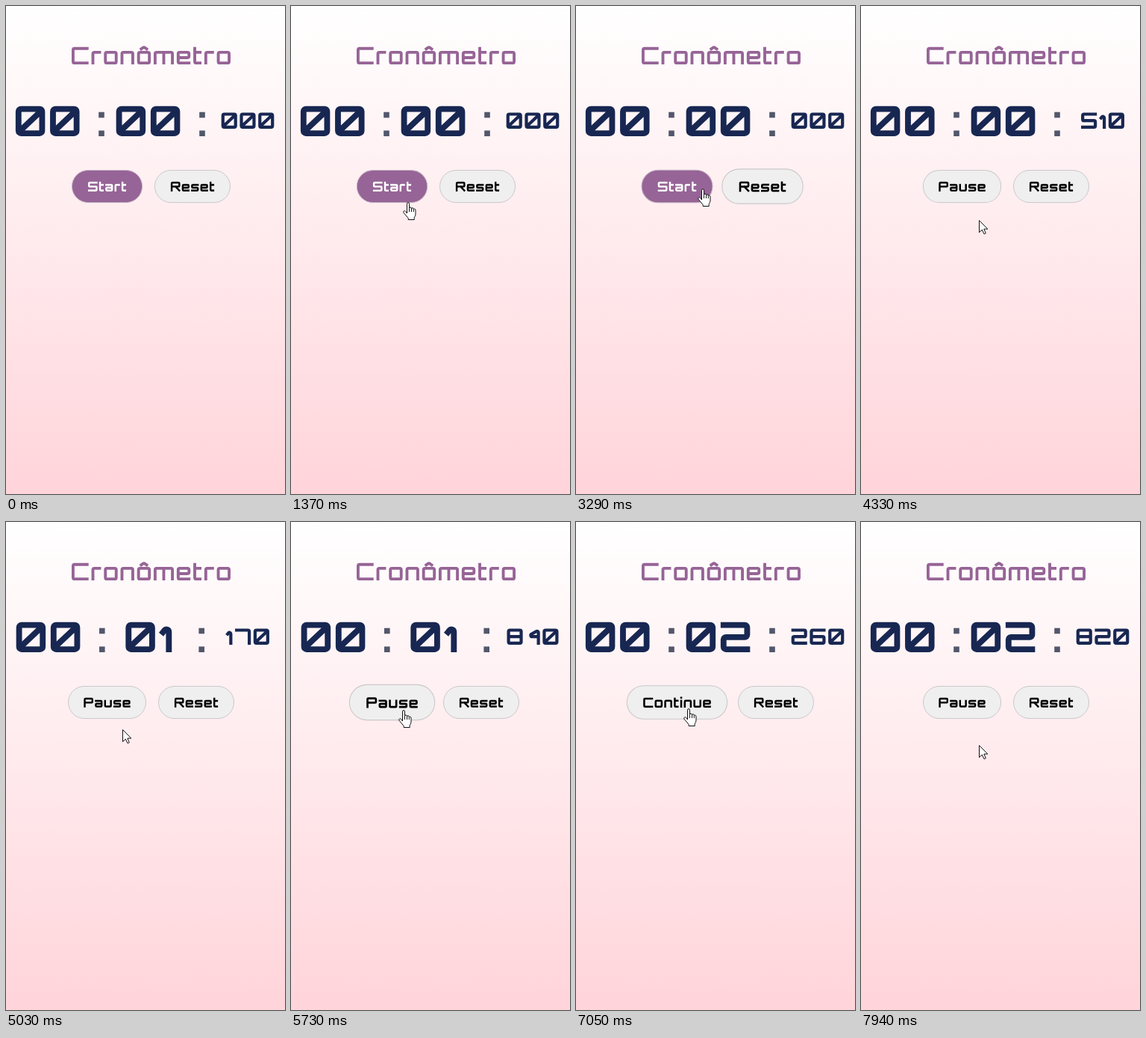
An HTML page with a canvas for the animation above (8000 ms loop, 374 by 652 pixels).

```html
<!DOCTYPE html>
<html lang="pt">
<head>
<meta charset="utf-8">
<title>Cronômetro</title>
<style>
  html, body { margin: 0; width: 100%; height: 100%; overflow: hidden; background: #fff; }
  canvas { display: block; width: 374px; height: 652px; }
</style>
</head>
<body>
<canvas role="img" aria-label="Cronômetro: Start, Pause, Continue, Reset">Cronômetro</canvas>
<script>
const W = 374, H = 652, LOOP = 8000;
const canvas = document.querySelector('canvas');
const ctx = canvas.getContext('2d');
const dpr = window.devicePixelRatio || 1;
canvas.width = W * dpr;
canvas.height = H * dpr;

const smooth = p => p * p * (3 - 2 * p);
const mix = (a, b, p) => a + (b - a) * p;

// Square lettering: every stroke joins points of a small lattice,
//   a b c
//   d e f
//   g h i
// with x y z above the lattice (or at the shoulder) and v, w as inner points.
const STROKES = {
  0: 'bcigab vw', 1: 'xci', 2: 'acfdgi', 3: 'acig df', 4: 'icdf',
  5: 'cadfig', 6: 'cagifd', 7: 'aci', 8: 'bcigab df', 9: 'fdacig',
  C: 'cagi', P: 'gacfd', R: 'gacfd ei', S: 'cadfig',
  a: 'acigdf', e: 'igacfd', i: 'bh yy', m: 'gaci bh', n: 'gaci', o: 'bcigab',
  ô: 'bcigab vyw', r: 'gac', s: 'cadfig', t: 'xgi ac', u: 'agic'
};
const ADVANCE = { 1: 40, 4: 77, i: 26, m: 96, r: 52, t: 46 };
const isLower = char => char !== char.toUpperCase();
const advanceOf = char => ADVANCE[char] || (isLower(char) ? 69 : 82.5);

// Lattice in hundredths of an em, baseline at 72; the outer bounds stay fixed for any weight.
function lattice(char, weight) {
  const half = weight / 2, lower = isLower(char);
  const left = 6 + half, right = advanceOf(char) - 6 - half;
  const top = (lower ? 16 : 0) + half, bottom = 72 - half;
  const at = (u, v) => [mix(left, right, u), mix(top, bottom, v)];
  const points = {};
  [...'abcdefghi'].forEach((name, i) => points[name] = at(i % 3 / 2, Math.floor(i / 3) / 2));
  const [x, v, w] = lower ? [half, 8, 8] : [24, mix(top, bottom, 0.85), mix(top, bottom, 0.15)];
  const inner = lower ? 0.25 : 0.12;
  points.x = [left, x];
  points.y = [(left + right) / 2, 0];
  points.v = [at(inner, 0)[0], v];
  points.w = [at(1 - inner, 0)[0], w];
  return points;
}

function drawGlyph(char, weight) {
  const points = lattice(char, weight);
  ctx.beginPath();
  for (const stroke of STROKES[char].split(' ')) {
    const pts = [...stroke].map(name => points[name]);
    ctx.moveTo(...pts[0]);
    for (let i = 1; i < pts.length - 1; i++) ctx.arcTo(...pts[i], ...pts[i + 1], 6);
    const [x, y] = pts[pts.length - 1];
    ctx.lineTo(x, y + 0.01);
  }
  ctx.stroke();
}

function lettering(text, cx, baseline, size, weight, color) {
  const chars = [...text];
  const width = chars.reduce((sum, char) => sum + advanceOf(char), 0);
  ctx.save();
  ctx.translate(cx, baseline);
  ctx.scale(size / 100, size / 100);
  ctx.translate(-width / 2, -72);
  ctx.lineWidth = weight;
  ctx.lineCap = 'square';
  ctx.lineJoin = 'round';
  ctx.strokeStyle = color;
  for (const char of chars) {
    drawGlyph(char, weight);
    ctx.translate(advanceOf(char), 0);
  }
  ctx.restore();
}

// The screen refreshes in even ticks after a first still moment.
const FIRST = 260, TICK = 7680 / 111;
const snap = t => t < FIRST ? 0 : FIRST + Math.floor((t - FIRST) / TICK + 0.25) * TICK;

// Resting points of the pointer: time, x, y.
const STOPS = [
  [FIRST, 326, 634], [1020, 185, 320], [1600, 140, 230], [2100, 139, 324], [2630, 141, 246],
  [3000, 232, 246], [3170, 232, 246], [3360, 152, 243], [3850, 150, 244], [4330, 158, 286],
  [4900, 158, 286], [5300, 150, 252], [6150, 150, 251], [6490, 150, 330], [6720, 150, 330],
  [7080, 150, 246], [7450, 150, 246], [7940, 158, 298]
];
function pointerAt(t) {
  if (t < FIRST) return null;
  const next = STOPS.findIndex(stop => stop[0] > t);
  if (next < 0) return STOPS[STOPS.length - 1].slice(1);
  const [t0, x0, y0] = STOPS[next - 1], [t1, x1, y1] = STOPS[next];
  const p = smooth((t - t0) / (t1 - t0));
  return [mix(x0, x1, p), mix(y0, y1, p)];
}

const START = 3806, PAUSE = 6165, RESUME = 7356, RATE = 0.96;
function elapsed(t) {
  const running = Math.max(0, Math.min(t, PAUSE) - START) + Math.max(0, t - RESUME);
  return Math.floor(running * RATE / 10) * 10;
}

const PURPLE = '#966496', NAVY = '#182752', GRAY = '#efefef';
const MIDDLE = 194.5, GAP = 16;

function buttonsAt(t) {
  const paused = t >= PAUSE && t < RESUME;
  const main = t < START ? { label: 'Start', width: 95, fill: PURPLE, ink: '#fff', border: '#c0aec0' }
    : { label: paused ? 'Continue' : 'Pause', width: paused ? 131 : 105 };
  const reset = { label: 'Reset', width: 102 };
  main.x = MIDDLE - (main.width + GAP + reset.width) / 2;
  reset.x = main.x + main.width + GAP;
  return [main, reset];
}

function isOver(index, t) {
  const at = pointerAt(t);
  if (!at) return false;
  const { x, width } = buttonsAt(t)[index];
  return at[0] >= x && at[0] <= x + width && at[1] >= 219 && at[1] <= 264;
}

// Buttons grow while hovered, easing over a fixed time since the pointer came or went.
function hoverScale(index, t) {
  const DURATION = 300, over = isOver(index, t);
  let age = 0;
  while (age < DURATION && isOver(index, t - age) === over) age += 5;
  const p = smooth(Math.min(1, age / DURATION) ** 0.65);
  return 1 + 0.1 * (over ? p : 1 - p);
}

function drawButton({ label, x, width, fill = GRAY, ink = '#000', border = '#ccc8ca' }, scale) {
  ctx.save();
  ctx.translate(x + width / 2, 241);
  ctx.scale(scale, scale);
  ctx.beginPath();
  ctx.roundRect(-width / 2 + 0.5, -21.5, width - 1, 43, 21.5);
  ctx.fillStyle = fill;
  ctx.fill();
  ctx.lineWidth = 1;
  ctx.strokeStyle = border;
  ctx.stroke();
  lettering(label, 0, 6.8, 18, 13.5, ink);
  ctx.restore();
}

const ARROW = new Path2D('M.5 .5V16.5L4.3 13L7 18.6L9.3 17.6L6.8 12H11.8Z');
const HAND = new Path2D('M5.5 15V2.2Q5.5 .6 7 .6T8.5 2.2V8.5Q8.5 7 10 7T11.5 8.8Q11.7 7.8 13 7.8' +
  'T14.3 9.8Q14.5 9 15.6 9T17 11V16Q17 18.5 15.2 20.5V23.5H7.2V21.5L1 14.2Q.2 12.5 1.6 11.8T4 12.8Z' +
  'M8.5 8.5V13M11.5 9V13M14.3 10V13');
function drawPointer([x, y], isHand) {
  const shape = isHand ? HAND : ARROW;
  ctx.save();
  ctx.translate(Math.round(isHand ? x - 6 : x), Math.round(y));
  ctx.lineWidth = 1;
  ctx.lineJoin = 'round';
  ctx.fillStyle = '#fff';
  ctx.strokeStyle = '#111';
  ctx.fill(shape);
  ctx.stroke(shape);
  ctx.restore();
}

function colon(cx) {
  ctx.fillStyle = '#53576b';
  for (const y of [141.7, 166.4]) ctx.fillRect(cx - 3.8, y, 7.6, 7.6);
}

const backdrop = ctx.createLinearGradient(0, 0, 0, H);
backdrop.addColorStop(0, '#fff');
backdrop.addColorStop(1, '#ffd4da');
const pad = (n, length) => String(Math.floor(n)).padStart(length, '0');

function render(t) {
  ctx.setTransform(dpr, 0, 0, dpr, 0, 0);
  ctx.fillStyle = backdrop;
  ctx.fillRect(0, 0, W, H);
  lettering('Cronômetro', MIDDLE, 78, 32.2, 12, PURPLE);

  const ms = elapsed(t);
  const seconds = pad(ms / 1000 % 60, 2);
  const slack = seconds.includes('1') ? 0.8 : 0; // a narrow digit lets its neighbours move in
  lettering(pad(ms / 60000, 2), 55.7 + slack, 174, 56, 14, NAVY);
  colon(128 + slack);
  lettering(seconds, 190.5 + slack, 174, 56, 14, NAVY);
  colon(263 - slack);
  lettering(pad(ms % 1000, 3), 324, 164, 30, 14, NAVY);

  buttonsAt(t).forEach((button, i) => drawButton(button, hoverScale(i, t)));
  const at = pointerAt(t);
  if (at) drawPointer(at, isOver(0, t) || isOver(1, t));
}

function frame() {
  render(snap(performance.now() % LOOP));
  requestAnimationFrame(frame);
}
frame();
</script>
</body>
</html>
```
